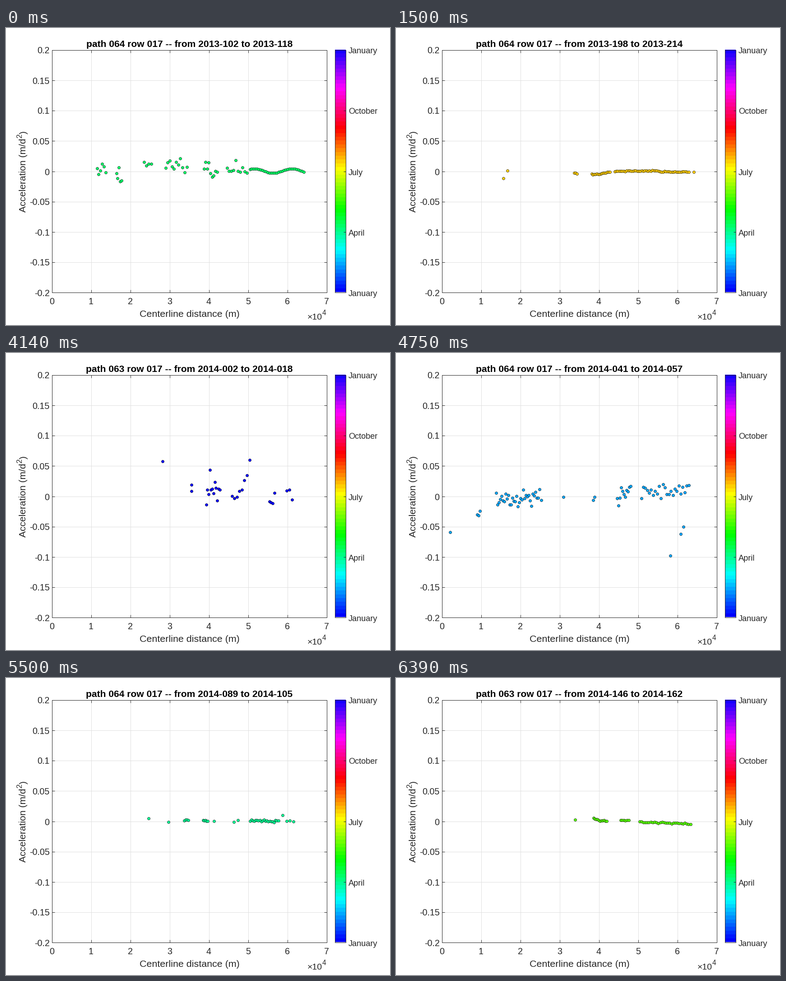
A matplotlib script that plays this animation: 851x658 px, repeating every 8000 ms.

```python
import colorsys
import numpy as np
import matplotlib.pyplot as plt
from matplotlib.animation import FuncAnimation
from matplotlib.collections import LineCollection

W, H, DPI = 851, 658, 100
PT = 72 / DPI                      # points per pixel
STEP, LOOP = 20, 8000              # ms
FIRST_DAY, MS_PER_DAY = 102, 1000 / 64
LEFT, RIGHT, TOP, BOTTOM = 102, 711, 49, 586
BAR_LEFT, BAR_RIGHT = 729, 753
INK, GRID = "#262626", "#dfdfdf"
LEVELS = 64

plt.rcParams["font.family"] = "Liberation Sans"


def level_color(i):
    return colorsys.hsv_to_rgb((2 / 3 - i / LEVELS) % 1, 1, 1)


def day_color(day):
    return level_color(int((day - 1) % 365 / 365 * LEVELS))


def date(day):
    return f"{2013 + (day - 1) // 365}-{(day - 1) % 365 + 1:03d}"


scenes = []


def scene(day, path, reaches, trend, spread, lone=()):
    """Scatter stations of each reach (x0, x1, count) around the trend line."""
    rng = np.random.default_rng(day)
    x = np.concatenate([np.linspace(*reach) for reach in reaches])
    y = np.interp(x, *np.transpose(trend)) + rng.normal(0, spread, len(x))
    points = np.column_stack([x, y])
    scenes.append((day, path, np.vstack([points, *lone])))


# Positions are in stage pixels; days count from the start of 2013.
scene(102, 64, [(202, 221, 6), (245, 256, 5), (306, 322, 4), (354, 401, 11),
                (439, 468, 9), (490, 534, 10)],
      [(202, 306), (250, 325), (320, 305), (390, 300), (450, 315)], 8,
      lone=[(x, 317 + 5 * np.sin(x / 13)) for x in np.linspace(541, 660, 31)])
scene(150, 64, [(202, 256, 8), (354, 401, 8), (437, 474, 12), (485, 649, 46)],
      [(202, 315), (649, 318)], 4)
scene(198, 64, [(395, 401, 3), (434, 474, 15), (485, 649, 50)],
      [(395, 322), (434, 325), (450, 324), (474, 319), (500, 317),
       (577, 317), (590, 319)], 0.7,
      lone=[(238, 333), (247, 316), (660, 319)])
scene(223, 63, [(238, 238, 1), (395, 404, 3), (436, 474, 13), (484, 653, 44)],
      [(238, 322), (653, 314)], 3)
scene(239, 63, [(436, 474, 15), (484, 545, 19), (547, 653, 25)],
      [(436, 325), (480, 327), (512, 320), (545, 309), (588, 294),
       (653, 292)], 5)
scene(367, 63, [(411, 411, 2), (444, 474, 12), (501, 540, 8), (584, 595, 4),
                (622, 634, 3)],
      [(411, 298), (460, 302), (505, 325), (540, 248), (588, 330),
       (634, 316)], 14, lone=[(347, 240)])
scene(390, 64, [(110, 186, 5), (222, 322, 24), (437, 520, 14), (544, 649, 24)],
      [(110, 330), (649, 316)], 11)
scene(406, 64, [(120, 120, 1), (180, 186, 3), (222, 322, 34), (371, 371, 1),
                (437, 440, 2), (490, 520, 11), (544, 649, 25)],
      [(120, 383), (183, 367), (222, 322), (322, 322), (490, 321),
       (520, 301), (649, 309)], 9,
      lone=[(608, 449), (631, 401), (637, 385)])
scene(415, 63, [(155, 320, 14), (436, 474, 10), (498, 653, 30)],
      [(155, 322), (653, 313)], 8)
scene(431, 63, [(216, 322, 8), (436, 474, 10), (498, 653, 34)],
      [(216, 319), (653, 316)], 5)
scene(454, 64, [(395, 404, 4), (437, 447, 5), (461, 461, 1), (505, 514, 2),
                (541, 604, 21), (622, 637, 3)],
      [(395, 315), (440, 317), (560, 316), (604, 318)], 1.6,
      lone=[(316, 311), (360, 319), (613, 304)])
scene(486, 64, [(395, 404, 3), (437, 474, 10), (490, 649, 40)],
      [(395, 317), (649, 319)], 1.6)
scene(511, 63, [(397, 397, 1), (438, 467, 11), (498, 516, 6), (540, 653, 28)],
      [(397, 315), (438, 311), (449, 316), (516, 316), (540, 319),
       (653, 323)], 0.8)

fig = plt.figure(figsize=(W / DPI, H / DPI), dpi=DPI, facecolor="white")
ax = fig.add_axes([0, 0, 1, 1])
ax.axis("off")


def text(x, y, s, px, ha="left", **kw):
    kw = {"color": INK, "va": "baseline", "rotation_mode": "anchor", **kw}
    return ax.text(x, y, s, fontsize=px * PT, ha=ha, **kw)


def lines(segments, color, z):
    ax.add_collection(LineCollection(segments, colors=color, linewidths=PT,
                                     capstyle="butt", zorder=z))


def frame_box(x0, y0, x1, y1):
    return [(x0, y0), (x1, y0), (x1, y1), (x0, y1), (x0, y0)]


# Color scale
strip = np.array([[level_color(i)] for i in range(LEVELS)])
ax.imshow(strip[::-1], extent=(BAR_LEFT, BAR_RIGHT, BOTTOM, TOP),
          aspect="auto", interpolation="nearest", zorder=1)

grid, axis = [], [frame_box(LEFT, TOP, RIGHT, BOTTOM),
                  frame_box(BAR_LEFT, TOP, BAR_RIGHT, BOTTOM)]
for i in range(8):
    x = LEFT + 87 * i
    grid.append([(x, TOP), (x, BOTTOM)])
    axis += [[(x, TOP), (x, TOP + 6)], [(x, BOTTOM), (x, BOTTOM - 6)]]
    text(x, 613, str(i), 19.6, "center")
for i in range(9):
    y = round(TOP + (BOTTOM - TOP) * i / 8)
    grid.append([(LEFT, y), (RIGHT, y)])
    axis += [[(LEFT, y), (LEFT + 6, y)], [(RIGHT, y), (RIGHT - 6, y)]]
    text(97, y + 8, f"{(4 - i) / 20:g}", 19.6, "right")
months = ["January", "October", "July", "April", "January"]
for i, month in enumerate(months):
    y = round(TOP + (BOTTOM - TOP) * i / 4)
    axis.append([(BAR_RIGHT, y), (BAR_RIGHT - 5, y)])
    text(759.5, y + 8, month, 18.2)
lines(grid, GRID, 1)
lines(axis, INK, 2)

text(407.5, 641, "Centerline distance (m)", 21.5, "center")
text(668, 646, "×10", 19.4)
text(701, 636.5, "4", 15.5)
text(45, 408, "Acceleration (m/d", 21, rotation=90)
text(35.5, 245, "2", 16.8, rotation=90)
text(45, 235.5, ")", 21, rotation=90)
title = text(407, 42, "", 21, "center", color="black", weight="bold")
dots, = ax.plot([], [], "o", ms=6 * PT, mec="black", mew=0.6 * PT, zorder=3)

# Whole coordinates fall on pixel centres, counted from one.
ax.set_xlim(0.5, W + 0.5)
ax.set_ylim(H + 0.5, 0.5)


def draw(frame):
    now = (frame + 1) * STEP
    day, path, points = [s for s in scenes
                         if (s[0] - FIRST_DAY) * MS_PER_DAY < now][-1]
    title.set_text(f"path {path:03d} row 017 -- "
                   f"from {date(day)} to {date(day + 16)}")
    dots.set_data(*points.T)
    dots.set_markerfacecolor(day_color(day))
    return title, dots


anim = FuncAnimation(fig, draw, frames=LOOP // STEP, interval=STEP,
                     repeat=True, cache_frame_data=False)
plt.show()
```
